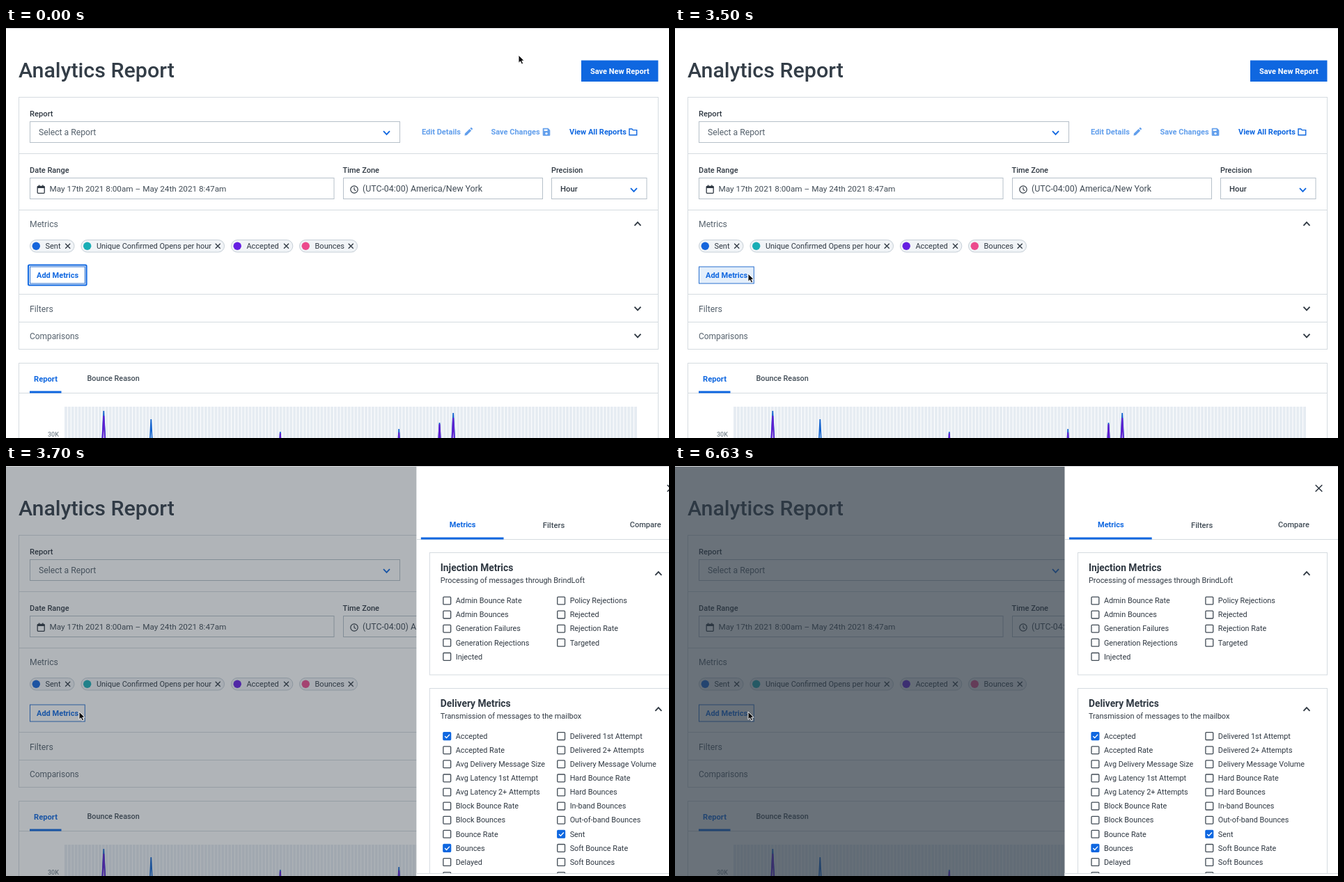
These frames come from a looping animation (952x589 px, 6.71 s). An HTML page:

```html
<!DOCTYPE html>
<html lang="en">
<head>
<meta charset="utf-8">
<title>Analytics Report</title>
<style>
  html, body { margin: 0; width: 100%; height: 100%; overflow: hidden; background: #fff; }
  svg { display: block; width: 100vw; height: 100vh; font-family: Roboto, sans-serif; }
  text { white-space: pre; }
</style>
</head>
<body>
<svg id="stage" viewBox="0 0 952 589" preserveAspectRatio="xMinYMin meet">
  <g id="page"></g>
  <rect id="shade" y="1" width="952" height="588" fill="#2c3742" opacity="0"/>
  <g id="panel"></g>
  <path d="M0 .5H952" stroke="#d4d6d9"/>
  <path id="cursor" d="M0 0V11.2L2.6 8.9L4.5 13L6.6 12.1L4.8 8.1H8.2Z"
        fill="#0b0b0d" stroke="#fff" stroke-width=".9" stroke-linejoin="round"/>
</svg>
<script>
const LOOP = 6710, FRAME = 100 / 3;
const OPEN = 3500, SLIDE = 347, FADE = 900, SHADE = 0.7, PANEL_W = 392.5;
const INK = '#2f3842', TEXT = '#414c56', MUTED = '#55616c';
const BLUE = '#0f67e0', PALE = '#629fec', LINE = '#d5dbe0', FIELD = '#b6c0c9';
const $ = id => document.getElementById(id);

// Markup helpers; text is centred on the height of its capitals.
const text = (x, y, s, size = 11, fill = INK, weight = 400) =>
  `<text x="${x}" y="${(y + size * 0.357).toFixed(2)}" font-size="${size}" fill="${fill}" font-weight="${weight}">${s}</text>`;
const rect = (x, y, w, h, fill = 'none', stroke = 'none', extra = '') =>
  `<rect x="${x}" y="${y}" width="${w}" height="${h}" fill="${fill}" stroke="${stroke}" ${extra}/>`;
const path = (d, stroke = INK, width = 1, fill = 'none') =>
  `<path d="${d}" stroke="${stroke}" stroke-width="${width}" fill="${fill}"/>`;
const dot = (x, y, r, fill) => `<circle cx="${x}" cy="${y}" r="${r}" fill="${fill}"/>`;
const chevron = (x, y, dir, color = INK) =>
  path(`M${x - 4.5} ${y - 2.4 * dir}l4.5 ${4.8 * dir}l4.5 ${-4.8 * dir}`, color, 1.8);
const cross = (x, y, r, width) =>
  path(`M${x - r} ${y - r}l${2 * r} ${2 * r}m0 ${-2 * r}l${-2 * r} ${2 * r}`, INK, width);
const field = (x, y, w) => rect(x, y, w, 30, '#fff', FIELD);

function chip(x, w, label, color) {
  return rect(x, 304.5, w, 17.5, '#f1f4f7', '#c5ced6', 'rx="8.75"') +
    dot(x + 8.8, 313.2, 5.7, color) + text(x + 22, 313.2, label) +
    cross(x + w - 9.3, 313.2, 3.5, 1.3);
}

function icons() {
  return path('M658.5 154.5l.5-3l6.6-6.6l2.6 2.6l-6.6 6.6Z', 'none', 0, PALE) +
    path('M666.3 144.2l1-1q.8-.6 1.5.1l.9 1q.6.8 0 1.4l-.9.9Z', 'none', 0, PALE) +
    path('M771.2 144.3h7.2l2.4 2.4v7.6h-9.6Z', PALE, 1, PALE) +
    rect(772.6, 145.5, 5, 2.4, '#fff') + dot(776, 151.6, 1.7, '#fff') +
    path('M895 145h3.8l1.4 1.6h5.5v7.1H895Z', BLUE, 1.4) +
    rect(45.2, 227.3, 10, 10, 'none', INK, 'rx="1" stroke-width="1.3"') +
    path('M45 228.7h10.4', INK, 2.6) + path('M47.6 225.4v2m5.2-2v2', INK, 1.4) +
    `<circle cx="500" cy="232" r="5.2" fill="none" stroke="${INK}" stroke-width="1.2"/>` +
    path('M500 228.8v3.4l2.3 1.5', INK, 1.1);
}

function chart() {
  const step = 823 / 168;
  let bars = '';
  for (let i = 0; i < 168; i++) bars += `M${(84 + i * step).toFixed(2)} 544h3.9v45h-3.9Z`;
  // Each peak: x, top of Sent, top of Accepted
  const peaks = [[140.3, 550, 557], [208.3, 562, 600], [393.8, 580, 582],
                 [564.2, 576, 581], [622.5, 567, 569], [642.2, 553, 560]];
  const spike = (x, y) => `M${x - step} ${y + 95}L${x} ${y}L${x + step} ${y + 95}`;
  return path(bars, 'none', 0, '#e6ecf2') +
    path(peaks.map(p => spike(p[0], p[1])).join(''), '#1565cf', 1.7) +
    path(peaks.map(p => spike(p[0], p[2])).join(''), '#5f1fd0', 2) +
    text(60, 584, '30K', 9, '#7b8791', 500);
}

function drawPage() {
  $('page').innerHTML =
    rect(0, 0, 952, 589, '#fff') +
    text(18, 60.2, 'Analytics Report', 30.4, '#333d47', 500) +
    rect(826, 46.5, 110.5, 30.5, BLUE) + text(839, 62, 'Save New Report', 11, '#fff', 600) +
    rect(18.5, 99.5, 918, 362, 'none', LINE) +
    path('M18 180.5H936M18 261.5H936M18 382.5H936M18 422.5H936', LINE) +
    text(34, 123, 'Report', 11.2, INK, 500) + field(34.5, 134.5, 531) +
    text(47, 150, 'Select a Report', 12.2, MUTED) + chevron(546.5, 150.5, 1, BLUE) +
    text(597, 149.5, 'Edit Details', 11, PALE, 600) +
    text(696.5, 149.5, 'Save Changes', 11, PALE, 600) +
    text(809, 149.5, 'View All Reports', 11, BLUE, 600) +
    text(34, 204, 'Date Range', 11, INK, 500) + field(34.5, 215.5, 436.5) +
    text(62.5, 231, 'May 17th 2021 8:00am – May 24th 2021 8:47am', 11.75, TEXT) +
    text(483.5, 204, 'Time Zone', 11, INK, 500) + field(484.5, 215.5, 286) +
    text(512, 231, '(UTC-04:00) America/New York', 12.35, TEXT) +
    text(783, 204, 'Precision', 10.8, INK, 500) + field(783.5, 215.5, 136.5) +
    text(796, 231, 'Hour', 11.3, INK, 500) + chevron(901.5, 232.5, 1, BLUE) +
    icons() +
    text(34, 282, 'Metrics', 12.2, MUTED) + chevron(907, 281.5, -1) +
    chip(34.5, 63.5, 'Sent', '#1565dc') +
    chip(107.9, 205.6, 'Unique Confirmed Opens per hour', '#19adb5') +
    chip(323.4, 88.4, 'Accepted', '#651ee2') +
    chip(421.5, 83, 'Bounces', '#ec4a8d') +
    rect(32, 340.5, 83.6, 29, 'none', BLUE, 'id="ring" stroke-width="2" rx="1.5"') +
    rect(34.5, 343, 78.8, 24, '#e4effb', 'none', 'id="hover"') +
    rect(34.5, 343, 78.8, 24, 'none', '#2a70cf') +
    text(44, 355, 'Add Metrics', 11, BLUE, 600) +
    text(34, 403.5, 'Filters', 12.3, MUTED) + chevron(907, 403, 1) +
    text(34, 443, 'Comparisons', 11.9, MUTED) + chevron(907, 442, 1) +
    rect(18.5, 481.5, 918, 120, 'none', LINE) + path('M18 524.5H936', LINE) +
    text(40, 503.5, 'Report', 11.2, BLUE, 600) + rect(34, 521.5, 45.5, 3, BLUE) +
    text(116.5, 503.5, 'Bounce Reason', 10.8, TEXT, 500) +
    chart();
}

function options(x, y, names) {
  return names.split('|').map((name, i) => {
    const cy = y + i * 20.1, on = name[0] === '*';
    return rect(x + 0.7, cy - 5.3, 10.8, 10.8, on ? BLUE : '#fff', on ? BLUE : '#414b55', 'rx="1" stroke-width="1.3"') +
      (on ? path(`M${x + 3} ${cy + .2}l2.4 2.4l4.4 -4.8`, '#fff', 1.4) : '') +
      text(x + 18.6, cy, name.replace('*', ''), 10.85);
  }).join('');
}

function card(y, h, title, note) {
  return rect(578.5, y, 358, h, '#fff', LINE) +
    text(594, y + 21.8, title, 13.8, INK, 700) + text(594, y + 39.5, note, 10.9) +
    chevron(907, y + 30, -1);
}

function drawPanel() {
  $('panel').innerHTML =
    rect(559.5, 1, 393, 588, '#fff') +
    cross(924.5, 32, 4.8, 1.6) +
    path('M560 105.5H952', LINE) + rect(566, 102.5, 118.7, 3, BLUE) +
    text(607, 84.5, 'Metrics', 11, BLUE, 600) +
    text(741, 84.5, 'Filters', 11.2, TEXT, 500) +
    text(866, 84.5, 'Compare', 11, TEXT, 500) +
    card(124.5, 175.5, 'Injection Metrics', 'Processing of messages through BrindLoft') +
    options(597.3, 193.4, 'Admin Bounce Rate|Admin Bounces|Generation Failures|Generation Rejections|Injected') +
    options(761.2, 193.4, 'Policy Rejections|Rejected|Rejection Rate|Targeted') +
    card(319.5, 300, 'Delivery Metrics', 'Transmission of messages to the mailbox') +
    options(597.3, 388, '*Accepted|Accepted Rate|Avg Delivery Message Size|Avg Latency 1st Attempt|Avg Latency 2+ Attempts|' +
      'Block Bounce Rate|Block Bounces|Bounce Rate|*Bounces|Delayed|Delayed Rate') +
    options(761.2, 388, 'Delivered 1st Attempt|Delivered 2+ Attempts|Delivery Message Volume|Hard Bounce Rate|Hard Bounces|' +
      'In-band Bounces|Out-of-band Bounces|*Sent|Soft Bounce Rate|Soft Bounces|Undetermined Bounces') +
    rect(559.5, 585, 393, 4, '#fff') + path('M560 585.5H952', LINE);
}

const clamp = v => Math.min(1, Math.max(0, v));
const easeOut = v => 1 - (1 - clamp(v)) ** 3;
const smooth = v => v * v * (3 - 2 * v);

// Pointer stops: time, x, y
const stops = [[0, 736, 39], [230, 704, 62], [1030, 704, 62], [1230, 690, 70],
               [1360, 690, 70], [2200, 137, 339], [2270, 137, 339], [2700, 105, 353]];
function pointer(t) {
  const i = stops.findIndex(s => s[0] > t);
  if (i < 0) return stops[stops.length - 1].slice(1);
  const [a, b] = [stops[i - 1], stops[i]];
  const k = smooth((t - a[0]) / (b[0] - a[0]));
  return [a[1] + (b[1] - a[1]) * k, a[2] + (b[2] - a[2]) * k];
}

function render(time) {
  const t = Math.floor((time % LOOP + 5) / FRAME) * FRAME;
  const [x, y] = pointer(t);
  const over = x < 113;
  $('cursor').setAttribute('transform', `translate(${x.toFixed(2)} ${y.toFixed(2)})`);
  $('ring').setAttribute('opacity', over ? 0 : 1);
  $('hover').setAttribute('opacity', over ? 1 - clamp((t - OPEN) / 200) : 0);
  $('shade').setAttribute('opacity', SHADE * easeOut((t - OPEN) / FADE));
  const shift = PANEL_W * (1 - easeOut((t - OPEN) / SLIDE));
  $('panel').setAttribute('transform', `translate(${shift.toFixed(2)} 0)`);
}

drawPage();
drawPanel();
const start = performance.now();
function tick() {
  render(performance.now() - start);
  requestAnimationFrame(tick);
}
tick();
</script>
</body>
</html>
```
